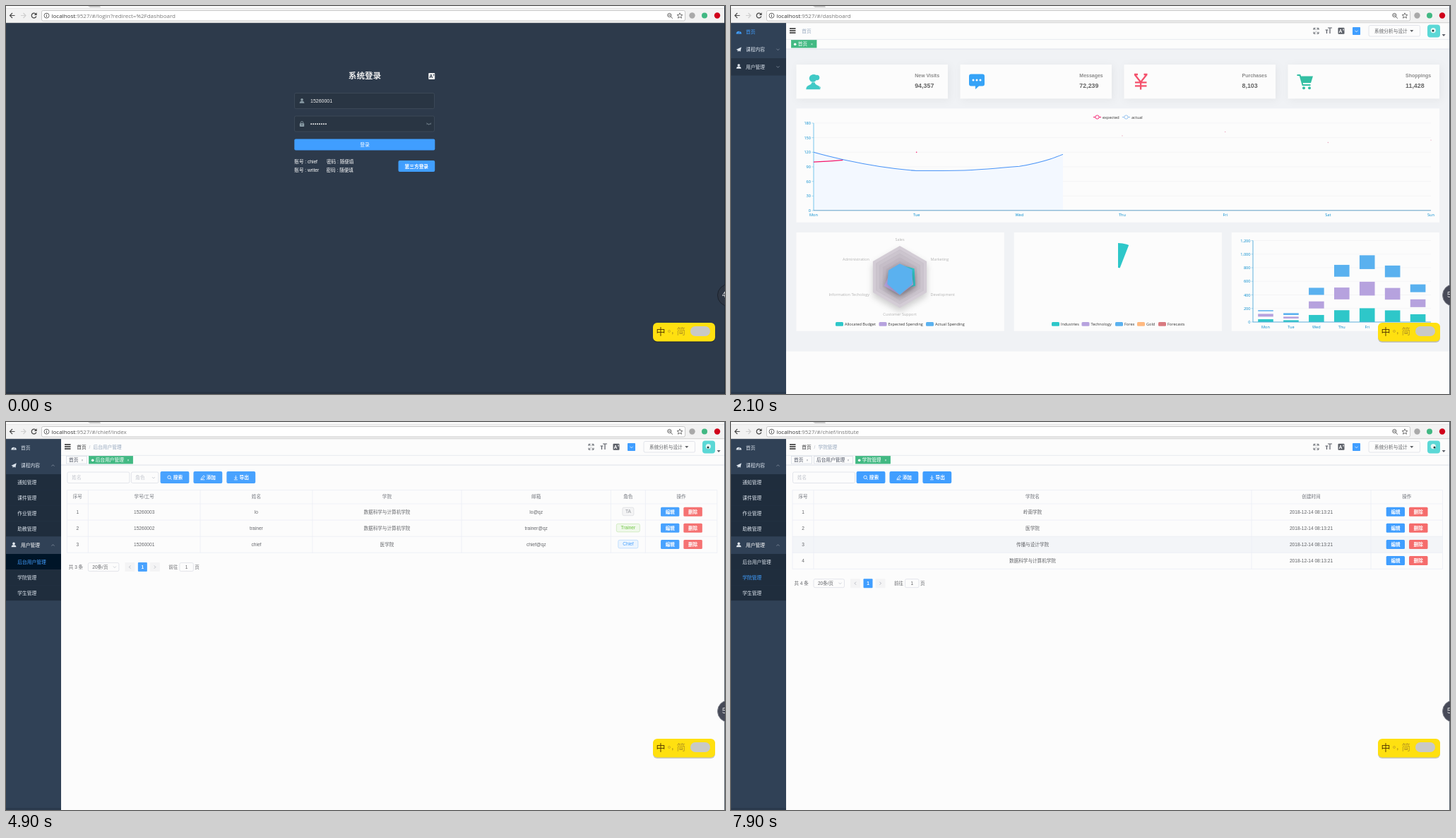
An HTML page that plays this animation: 1018x550 px, repeating every 8 s.

```html
<!DOCTYPE html>
<html lang="zh">
<head>
<meta charset="utf-8">
<title>系统登录</title>
<style>
html, body { margin: 0; width: 100%; height: 100%; overflow: hidden; background: #fcfcfc; }
svg { display: block; }
text { font-family: 'Liberation Sans', 'Noto Sans CJK SC', 'Noto Sans CJK', sans-serif; white-space: pre; }
.c { font-family: 'Open Sans', 'Noto Sans', 'Noto Sans CJK SC', sans-serif; }
</style>
</head>
<body>
<svg id="stage" width="1018" height="550" viewBox="0 0 1018 550"></svg>
<script>
const LOOP = 8000, STEP = 100;
const MID = 'text-anchor="middle" ', END = 'text-anchor="end" ', BOLD = 'font-weight="700" ', CH = 'class="c" ';
const BLUE = '#409eff', PAPER = '#fcfcfc', GREEN = '#42b983', INK = '#606266', EDGE = '#dcdfe6';
const PALETTE = ['#2ec7c9', '#b6a2de', '#5ab1ef', '#ffb980', '#d87a80'];
const DAYS = ['Mon', 'Tue', 'Wed', 'Thu', 'Fri', 'Sat', 'Sun'];

const clamp = v => Math.max(0, Math.min(1, v));
const at = (t, steps) => steps.reduce((v, s) => t >= s[0] ? s[1] : v, steps[0][1]);
const expOut = p => p >= 1 ? 1 : 1 - 2 ** (-10 * p);
const cubicInOut = p => p < .5 ? 4 * p ** 3 : 1 - 4 * (1 - p) ** 3;
const quadOut = p => p * (2 - p);
// CSS "ease"
function ease(x) {
  x = clamp(x);
  if (x === 0 || x === 1) return x;
  let a = 0, b = 1, m;
  const bez = (u, p, q) => 3 * (1 - u) ** 2 * u * p + 3 * (1 - u) * u * u * q + u ** 3;
  for (let i = 0; i < 20; i++) {
    m = (a + b) / 2;
    if (bez(m, .25, .25) < x) a = m; else b = m;
  }
  return bez(m, .1, 1);
}

const R = (x, y, w, h, fill, o = '') => `<rect x="${x}" y="${y}" width="${w}" height="${h}" fill="${fill}" ${o}/>`;
const C = (x, y, r, fill, o = '') => `<circle cx="${x}" cy="${y}" r="${r}" fill="${fill}" ${o}/>`;
const P = (d, fill, o = '') => `<path d="${d}" fill="${fill}" ${o}/>`;
const L = (d, c, w = 1, o = '') => `<path d="${d}" fill="none" stroke="${c}" stroke-width="${w}" ${o}/>`;
const T = (x, y, s, size = 6.7, fill = INK, o = '') => `<text x="${x}" y="${y + size * .36}" font-size="${size}" fill="${fill}" ${o}>${s}</text>`;
const G = (x, y, body, o = '') => `<g transform="translate(${x} ${y})" ${o}>${body}</g>`;
const box = (x, y, w, h, c = EDGE, fill = PAPER) => R(x + .5, y + .5, w - 1, h - 1, fill, `rx="2" stroke="${c}" stroke-width=".8"`);
const chevron = (x, y, c, up) => L(`M${x - 2} ${y + (up ? 1 : -1)}l2 ${up ? -2 : 2}l2 ${up ? 2 : -2}`, c, .8);
const person = (x, y, c) => C(x, y - 1.6, 1.8, c) + P(`M${x - 3.4} ${y + 3.2}q0 -3 3.4 -3t3.4 3z`, c);

function langIcon(x, y, fill, ink) {
  return R(x - 4.5, y - 4.5, 9, 9, fill, 'rx="1"') + T(x - 1, y + .4, 'A', 7, ink, MID + BOLD) + L(`M${x + 2} ${y - 2}h2m-1 -1v3`, ink, .6);
}

function browser(t) {
  const path = at(t, [[0, 'login?redirect=%2Fdashboard'], [1000, 'dashboard'], [4000, 'chief/index'], [6200, 'chief/institute']]);
  return R(0, 0, 1018, 24, '#f2f2f2') + R(0, 0, 1018, 3, '#fafafa') + L('M0 3.5H1018', '#e2e2e2', .8)
    + P('M116 0h17l1 2h-15z', '#c9c9c9') + L('M0 23.7H1018', '#b9b9b9', .6)
    + L('M12.5 13.5H5.5m3.5 -3.5l-3.5 3.5l3.5 3.5', '#4a4a4a', 1.2) + L('M21 13.5h7m-3.5 -3.5l3.5 3.5l-3.5 3.5', '#cfcfcf', 1.2)
    + L('M42.4 11.5a3.4 3.4 0 1 0 .5 3', '#444', 1.2) + P('M43.6 9.3v3.8h-3.8z', '#444')
    + box(50, 6, 912, 15.5, '#bdbdbd', '#fff')
    + C(57.5, 13.6, 3.5, 'none', 'stroke="#555" stroke-width=".9"') + L('M57.5 13v2.6m0 -4.3v1', '#555', 1)
    + `<text class="c" x="64.5" y="16.6" font-size="8" fill="#777"><tspan fill="#333">localhost</tspan>:9527/#/${path}</text>`
    + C(939.3, 13, 2.6, 'none', 'stroke="#555" stroke-width=".9"') + L('M941.2 15l2.6 2.6M938 13h2.6', '#555', 1)
    + L('M954 9.8l1.1 2.6 2.8 .2 -2.1 1.8 .7 2.8 -2.5 -1.5 -2.5 1.5 .7 -2.8 -2.1 -1.8 2.8 -.2z', '#555', .8)
    + C(971.5, 13.5, 4.2, '#a9a9a9') + C(989, 13.5, 4, '#41b883') + C(1007, 13.5, 4.2, '#d0021b');
}

function login(t) {
  const field = y => box(408, y, 199, 23, '#414d5c', '#293543');
  let s = R(0, 24, 1018, 526, '#2d3a4b') + R(0, 547, 1018, 3, '#283342')
    + T(508, 99, '系统登录', 11.6, '#eee', MID + BOLD) + langIcon(602.7, 99.5, '#f2f2f2', '#2d3a4b')
    + field(123) + field(155.5) + person(419, 134.5, '#889aa4') + T(431, 134.5, '15260001', 7, '#f2f2f2')
    + R(415.8, 166.3, 6.4, 4.6, '#889aa4', 'rx=".7"') + L('M417.2 166.5v-1a1.8 1.8 0 0 1 3.6 0v1', '#889aa4', .9) + C(419, 168.4, .7, '#293543');
  for (let i = 0; i < 8; i++) s += C(432.2 + i * 2.95, 167.2, 1, '#f2f2f2');
  s += L('M595.3 165.8q3.4 3.4 6.8 0m-5.6 1.2l-.7 1.1m5 -1.1l.7 1.1m-2.8 -.5v1.2', '#889aa4', .7)
    + R(408.3, 188.5, 199, 16, t < 700 ? BLUE : '#50a6ff', 'rx="2"') + T(508, 196.6, '登录', 6.8, '#fff', MID);
  ['chief', 'writer'].forEach((name, i) => {
    const y = 220.5 + i * 11.8;
    s += T(408.3, y, '账号 : ' + name, 6.6, '#fff') + T(454 - i * .5, y, '密码 : 随便填', 6.6, '#fff');
  });
  return s + R(555.5, 219, 51.7, 16, BLUE, 'rx="2"') + T(581.3, 227.2, '第三方登录', 6.7, '#fff', MID + BOLD);
}

function sidebar(t) {
  const hover = at(t, [[0, ''], [1900, '用户管理'], [2200, '课程内容'], [2700, '通知管理'], [2800, '课件管理'], [2900, '作业管理'],
    [3000, '助教管理'], [3200, '用户管理'], [3700, '后台用户管理'], [5400, '学院管理'], [7000, '']]);
  const active = at(t, [[0, '首页'], [4200, '后台用户管理'], [6300, '学院管理']]);
  const open1 = ease((t - 2350) / 300), open2 = ease((t - 3350) / 300);
  const hue = n => n === active ? BLUE : '#dbe3ec';
  const top = (y, n) => (hover === n ? R(0, y, 78, 24.5, '#263445') : '') + T(21, y + 12.2, n, 6.75, n === '用户管理' && t >= 4200 ? '#fff' : hue(n));
  const subs = (y, names, k, id) => k <= 0 ? '' : `<clipPath id="${id}">${R(0, y, 78, names.length * 22.1 * k, '#000')}</clipPath><g clip-path="url(#${id})">`
    + names.map((n, i) => R(0, y + i * 22.1, 78, 22.2, n === hover ? '#001528' : '#1f2d3d') + T(16.3, y + i * 22.1 + 11.3, n, 6.75, hue(n))).join('') + '</g>';
  const y2 = 74 + 88.4 * open1;
  return R(0, 24, 78, 526, '#304156') + R(0, 547, 78, 3, '#2a394c')
    + top(24.5, '首页') + P('M7.4 39.5a3.7 3.7 0 1 1 7.4 0z', hue('首页')) + L('M11 38.8l1.3 -2.6', '#304156', .7)
    + top(49.2, '课程内容') + P('M7.5 61.8l7.2 -3.6 -1.4 6.6 -2.1 -1.3 -1.5 1.6 -.2 -2.3z', '#dbe3ec') + chevron(66.5, 61.7, '#8794a4', open1 > .5)
    + subs(74, ['通知管理', '课件管理', '作业管理', '助教管理'], open1, 'sub1')
    + top(y2, '用户管理') + person(11, y2 + 11.6, '#e3e9f0') + chevron(66.5, y2 + 12.3, '#8794a4', open2 > .5)
    + subs(y2 + 24.6, ['后台用户管理', '学院管理', '学生管理'], open2, 'sub2');
}

function header(t) {
  const page = t < 4000 ? 0 : t < 6200 ? 1 : 2, name = ['首页', '后台用户管理', '学院管理'][page];
  const shown = page === 0 ? 0 : ease((t - (page === 1 ? 4150 : 6250)) / 500);
  const tab = (x, w, s, on) => R(x + .5, 48.5, w - 1, 10.5, on ? GREEN : PAPER, `stroke="${on ? GREEN : '#d8dce5'}" stroke-width=".8"`)
    + (on ? C(x + 5.7, 54.3, 1.8, '#fff') : '') + T(x + (on ? 9.8 : 4), 53.9, s, 6.7, on ? '#fff' : '#495060') + T(x + w - 7, 54.5, '×', 5, on ? '#fff' : '#8b919c', MID);
  const k = Math.floor(t / STEP);
  let s = R(78, 24, 940, 37, PAPER) + L('M78 47.4H1018', '#e4e7ed', .8) + L('M78 61H1018', '#d8dce5', .9)
    + L('M83 32h8.5m-8.5 3h8.5m-8.5 3h8.5', '#222', 1.3)
    + T(100.3, 35.2, '首页', 6.7, page ? '#303133' : '#97a8be')
    + (page ? T(117.5, 35.2, '/', 6.7, '#b6bcc8') + T(123.5, 35.2, name, 6.7, '#97a8be', `opacity="${shown}"`) : '')
    + L('M825 34v-2.6h2.6M832 34v-2.6h-2.6M825 36.6v2.6h2.6M832 36.6v2.6h-2.6M825.3 31.7l2.4 2.4m4 -2.4l-2.4 2.4m-4 4.8l2.4 -2.4m4 2.4l-2.4 -2.4', '#5a5e66', .9)
    + L('M841.5 34h4m-2 0v5M845 31h6m-3 0v8', '#5a5e66', 1.2) + langIcon(864, 35.3, '#5a5e66', '#fff')
    + R(880, 30, 11, 11, BLUE, 'rx=".8"') + chevron(885.5, 35.8, '#fff')
    + box(902.5, 27, 73.5, 16.5) + T(911, 35.4, '系统分析与设计', 6.7) + P('M961.3 34h5l-2.5 3z', INK)
    + R(986, 26.5, 18, 18, '#5bd8d6', 'rx="4"') + C(994.3, 34.6, 3.6, '#e6f7f4') + C(993 + k % 4, 35 + k % 3, 1.5, '#24383a')
    + P('M1006.6 40h5l-2.5 3z', '#5a5e66');
  if (!page) return s + tab(85, 36.5, '首页', true);
  s += tab(85, 30, '首页');
  return s + (page === 1 ? tab(117, 63, name, true) : tab(117, 56, '后台用户管理') + tab(176, 50, name, true));
}

// smooth line through seven daily values, handles kept inside the data range
function curve(values) {
  const pts = values.map((v, i) => [117 + i * 145.67, 290 - v * .689]);
  const ys = pts.map(p => p[1]), lo = Math.min(...ys), hi = Math.max(...ys);
  const fit = (x, y) => `${x.toFixed(2)} ${Math.max(lo, Math.min(hi, y)).toFixed(2)} `;
  let d = `M${pts[0]}`, h = pts[0];
  for (let i = 1; i < pts.length; i++) {
    const a = pts[i - 1], p = pts[i], b = pts[i + 1] || p;
    const prev = Math.hypot(p[0] - a[0], p[1] - a[1]), next = Math.hypot(b[0] - p[0], b[1] - p[1]);
    const r = next / (next + prev), vx = (b[0] - a[0]) / 2, vy = (b[1] - a[1]) / 2;
    const c = b === p ? p : [p[0] - vx * (1 - r), p[1] - vy * (1 - r)];
    d += 'C' + fit(...h) + fit(...c) + fit(...p);
    h = [p[0] + vx * r, p[1] + vy * r];
  }
  return d;
}
const EXPECTED = [100, 120, 161, 134, 105, 160, 165], ACTUAL = [120, 82, 91, 154, 162, 140, 145];

function lineChart(ms) {
  const p = clamp(ms / 2800), w1 = 874 * cubicInOut(p), w2 = 874 * quadOut(p), blue = curve(ACTUAL);
  let s = '';
  for (let v = 0; v <= 180; v += 30) {
    const y = 290 - v * .689;
    s += L(`M117 ${y}H991`, '#f0f0f1', .6) + T(113, y, v, 5.6, '#008acd', CH + END) + L(`M114.5 ${y}h2.5`, '#7cc4e8', .6);
  }
  s += `<clipPath id="w1">${R(116, 146, w1 + 1, 150, '#000')}</clipPath><clipPath id="w2">${R(116, 146, w2 + 1, 150, '#000')}</clipPath>`
    + P(blue + 'V290H117z', '#f3f8ff', 'clip-path="url(#w2)"')
    + L('M117 166V290', '#69c0ea', .9) + L('M117 289.8H991', '#5599c4', .9)
    + L(curve(EXPECTED), '#f5176a', 1.1, 'clip-path="url(#w1)"') + L(blue, '#4a94f7', 1.1, 'clip-path="url(#w2)"');
  DAYS.forEach((d, i) => {
    const x = 117 + i * 145.67;
    s += T(x, 296, d, 5.6, '#008acd', CH + MID);
    if (x > 117 + w2) s += C(x, 290 - ACTUAL[i] * .689, .7, '#e9a0b8');
    if (x > 117 + w1 && (i === 1 || i > 4 && p > .5)) s += C(x, 290 - EXPECTED[i] * .689, .8, '#f5176a');
  });
  [[513, '#f5176a', 'expected'], [554, '#8dbdee', 'actual']].forEach(([x, c, n]) => {
    s += L(`M${x} 157.5h11`, c, 1) + C(x + 5.5, 157.5, 2.6, PAPER, `stroke="${c}" stroke-width=".9"`) + T(x + 13, 157.5, n, 5.6, '#333', CH);
  });
  return s;
}

const legend = items => items.map(([x, n], i) => R(x, 448, 11, 5.8, PALETTE[i], 'rx="1.5"') + T(x + 13, 451, n, 5.57, '#333', CH)).join('');

function radarChart(ms) {
  const k = expOut(ms / 3000);
  const ring = v => 'M' + v.map((r, i) => `${239 - 44 * r * Math.sin(i * Math.PI / 3)} ${384 - 44 * r * Math.cos(i * Math.PI / 3)}`).join('L') + 'z';
  const hex = r => ring(Array(6).fill(r));
  let s = '<filter id="blur" x="-50%" y="-50%" width="200%" height="200%"><feGaussianBlur stdDeviation="5"/></filter>'
    + G(0, 5, P(hex(1), '#555', 'opacity=".28" filter="url(#blur)"')) + P(hex(1), '#d3ccd5');
  for (let i = 7; i; i--) s += P(hex(i / 8), 'rgba(80,65,85,.05)', 'stroke="#b9b1bc" stroke-width=".3"');
  [[.5, .35, .6, .55, .75, .7], [.4, .45, .75, .75, .65, .55], [.55, .55, .6, .75, .6, .6]].forEach((v, i) => {
    const d = ring(v.map(n => n * k));
    s += G(0, 3, P(d, '#333', 'opacity=".25" filter="url(#blur)"')) + P(d, PALETTE[i]);
  });
  [[239, 331, 'Sales', MID], [196, 359, 'Administration', END], [196, 409, 'Information Techology', END],
    [239, 437, 'Customer Support', MID], [282.5, 409, 'Development', ''], [282.5, 359, 'Marketing', '']]
    .forEach(([x, y, n, o]) => s += T(x, y, n, 5.5, '#b3b3b3', CH + o));
  return s + legend([[148, 'Allocated Budget'], [209.5, 'Expected Spending'], [276, 'Actual Spending']]);
}

function pieChart(ms) {
  const X = 548, Y = 378, full = cubicInOut(clamp(ms / 2600)) * 2 * Math.PI;
  const pt = (r, a) => `${X + r * Math.sin(a)} ${Y - r * Math.cos(a)}`;
  const sector = (r0, r, a, b) => `M${pt(r0, a)}L${pt(r, a)}A${r} ${r} 0 ${b - a > Math.PI ? 1 : 0} 1 ${pt(r, b)}L${pt(r0, b)}A${r0} ${r0} 0 ${b - a > Math.PI ? 1 : 0} 0 ${pt(r0, a)}z`;
  const labels = [['M586.5 361L592 359H598', 599, 359, 'Industries', ''], ['M546.5 411L537 427H523', 522, 427, 'Technology', END],
    ['M525 381L510 383.5H494', 493, 384, 'Forex', END], ['M535 365L530 346H514', 512, 346, 'Gold', END], ['M545 365L541 336H525', 523, 336, 'Forecasts', END]];
  let a = 0, s = `<clipPath id="sweep"><path d="${sector(.1, 200, 0, Math.min(full, 6.283))}"/></clipPath><g clip-path="url(#sweep)">`;
  [320, 240, 149, 100, 59].forEach((v, i) => {
    const b = a + v / 868 * 2 * Math.PI, [d, x, y, n, o] = labels[i];
    s += P(sector(7, 7 + 35 * v / 320, a, b), PALETTE[i]) + L(d, PALETTE[i], .6) + T(x, y, n, 5.5, PALETTE[i], CH + o);
    a = b;
  });
  return s + '</g>' + legend([[454, 'Industries'], [496.5, 'Technology'], [544, 'Forex'], [575, 'Gold'], [605, 'Forecasts']]);
}

function barChart(ms) {
  const k = expOut(ms / 6000), u = .09625;
  let s = '';
  for (let v = 0; v <= 1200; v += 200) {
    const y = 448 - v * u;
    s += L(`M739 ${y}H991`, '#f0f0f1', .6) + T(735.5, y, v.toLocaleString('en-US'), 5.6, '#008acd', CH + END) + L(`M736.5 ${y}h2.5`, '#7cc4e8', .6);
  }
  [79, 52, 200, 334, 390, 330, 220].forEach((v, i) => {
    const x = 757 + i * 35.93;
    let base = 448;
    [v, i ? v : 80, i ? v : 30].forEach((n, j) => {
      s += R(x - 10.8, base - n * u * k, 21.6, n * u * k, PALETTE[j]);
      base -= n * u;
    });
    s += T(x, 454.5, DAYS[i], 5.6, '#008acd', CH + MID);
  });
  return s + L('M739 332.5V448', '#4fa9da', .9) + L('M739 448H991', '#4fa9da', .9);
}

function counters(t) {
  const ms = t < 2100 ? (t - 1197) * 1.052 : t < 3100 ? 950 + (t - 2100) * 1.052 : 2002 + (t - 3100) * .985;
  const cards = [['New Visits', 102400, 2600, 260.2], ['Messages', 81212, 3000, 493.3], ['Purchases', 9280, 3200, 723.5], ['Shoppings', 13600, 3600, 955]];
  const icons = [
    C(117.5, 101.5, 4.6, '#40c9c6') + C(121.5, 101.5, 3.8, '#40c9c6') + P('M115 107q3 4 9 6q3.500 1.500 3 4h-8z', '#40c9c6') + P('M106 118.500q0 -5 4.500 -6.500q4 -1.500 3.500 -4h5q-.5 2.500 3 4q4.500 1.500 4.500 6.500z', '#40c9c6', 'stroke="#fcfcfc" stroke-width=".6"') + C(116, 102.5, 5.2, '#40c9c6'),
    P('M340 96.500h16q3 0 3 3v11q0 3 -3 3h-5l-5 4.500v-4.500h-6q-3 0 -3 -3v-11q0 -3 3 -3z', '#36a3f7') + [343, 348, 353].map(x => C(x, 105, 1.5, '#fff')).join(''),
    L('M571.500 97l8.600 11l8.600 -11M580.100 108v10.500M572 108.300h16.500m-16.500 5h16.500M571 97h5m8.500 0h5', '#f4516c', 2.3),
    L('M801.500 98h4l4 14h11', '#34bfa3', 2) + P('M806 99.500h18l-3 9.500h-12.500z', '#34bfa3') + C(811, 116.2, 2, '#34bfa3') + C(819, 116.2, 2, '#34bfa3')];
  return cards.map(([n, end, span, x], i) => {
    const p = clamp(ms / span), v = p >= 1 ? end : Math.round(end * (1 - 2 ** (-10 * p)) * 1024 / 1023);
    return R(92.5 + i * 232, 83, 214.5, 48.300, PAPER, 'style="filter:drop-shadow(2px 2px 6px rgba(0,0,0,.05))"') + icons[i]
      + T(x, 98.5, n, 7, '#8c8c8c', BOLD) + T(x, 113, v.toLocaleString('en-US'), 8.9, '#666', BOLD);
  }).join('');
}

function dashboard(t) {
  const ms = Math.max(0, (t - 1498) * 1.06);
  return R(78, 61.5, 940, 428, '#f0f2f5') + counters(t) + R(92.5, 145.300, 910.5, 161.5, PAPER)
    + [92.5, 400.7, 708.8].map(x => R(x, 321, 294.2, 139.800, PAPER)).join('')
    + (t < 4000 ? lineChart(ms) + radarChart(ms) + pieChart(ms) + barChart(ms) : '');
}

const TAGS = { TA: ['#f4f4f5', '#909399', '#dedfe2', 17], Trainer: ['#f0f9eb', '#67c23a', '#c9e9b8', 34], Chief: ['#ecf5ff', BLUE, '#b3d8ff', 29] };
const BTN_ICONS = [
  (x, y) => C(x - .5, y - .5, 2.2, 'none', 'stroke="#fff" stroke-width=".8"') + L(`M${x + 1} ${y + 1}l2 2`, '#fff', .8),
  (x, y) => L(`M${x - 2} ${y + 1}l3.500 -4l1.500 1.500l-3.500 3.800l-1.700 .3zM${x - 3} ${y + 3}h6`, '#fff', .8),
  (x, y) => L(`M${x} ${y - 3}v4.500m-1.800 -1.800l1.800 1.800l1.800 -1.800M${x - 2.500} ${y + 3}h5`, '#fff', .8)];

function table({ edges, heads, rows, buttons, role }, hot) {
  const mid = i => (edges[i] + edges[i + 1]) / 2, bottom = 116 + rows.length * 23.1, y = bottom + 20.300;
  let s = R(78, 61.500, 940, 488.500, PAPER) + box(87, 70.500, 89, 16.500) + T(94, 79, '姓名', 6.6, '#c0c4cc');
  if (role) s += box(177.500, 70.500, 39.500, 16.500) + T(184, 79, '角色', 6.6, '#c0c4cc') + chevron(209.500, 79, '#c0c4cc');
  ['搜索', '添加', '导出'].forEach((n, i) => {
    const x = buttons + i * 46.900;
    s += R(x, 70, 40.800, 17, BLUE, 'rx="2"') + BTN_ICONS[i](x + 13, 78.800) + T(x + 18.200, 78.800, n, 6.7, '#fff', BOLD);
  });
  if (hot >= 0) s += R(87, 116 + hot * 23.1, 920.500, 23.1, '#f3f5f8');
  heads.forEach((h, i) => s += T(mid(i), 105.800, h, 6.6, '#6f737b', MID));
  rows.forEach((row, r) => {
    const cy = 127.200 + r * 23.1, last = edges.length - 2;
    [r + 1, ...row].forEach((v, i) => {
      const tag = role && i === last - 1 && TAGS[v];
      if (tag) s += box(mid(i) - tag[3] / 2, cy - 6.500, tag[3], 12.500, tag[2], tag[0]);
      s += T(mid(i), cy - (tag ? .3 : 0), v, 6.6, tag ? tag[1] : INK, MID);
    });
    s += R(927.700, cy - 6.500, 26.300, 13, BLUE, 'rx="1.500"') + T(941, cy + .2, '编辑', 6.600, '#fff', MID + BOLD)
      + R(960, cy - 6.500, 26.500, 13, '#f56c6c', 'rx="1.500"') + T(973.200, cy + .2, '删除', 6.600, '#fff', MID + BOLD)
      + L(`M87 ${116 + r * 23.1}H1007.500`, '#ebeef5', .8);
  });
  s += L(`M87 96.500H1007.500M87 ${bottom}H1007.500`, '#ebeef5', .8);
  edges.forEach(x => s += L(`M${x} 96.500V${bottom}`, '#ebeef5', .8));
  return s + T(89.500, y, `共 ${rows.length} 条`, 6.500) + box(116.500, y - 6.500, 44.500, 13) + T(123, y, '20条/页', 6.500) + chevron(154.500, y, '#c0c4cc')
    + R(169, y - 6.500, 14, 13, '#f4f4f5', 'rx="1"') + L(`M177 ${y - 2}l-2 2l2 2`, '#a9adb5', .8)
    + R(187.500, y - 6.500, 13, 13, BLUE, 'rx="1"') + T(194, y, '1', 6.500, '#fff', MID + BOLD)
    + R(204.500, y - 6.500, 14, 13, '#f4f4f5', 'rx="1"') + L(`M210.500 ${y - 2}l2 2l-2 2`, '#a9adb5', .8)
    + T(231, y, '前往', 6.500) + box(246, y - 6.500, 20.500, 13) + T(256.200, y, '1', 6.500, INK, MID) + T(268, y, '页', 6.500);
}

const SCHOOL = '数据科学与计算机学院', STAMP = '2018-12-14 08:13:21';
const USERS = {
  edges: [87, 117, 275.700, 434.500, 645.700, 857, 906, 1007.500], role: true, buttons: 219.200,
  heads: ['序号', '学号/工号', '姓名', '学院', '邮箱', '角色', '操作'],
  rows: [['15260003', 'lo', SCHOOL, 'lo@qz', 'TA'], ['15260002', 'trainer', SCHOOL, 'trainer@qz', 'Trainer'], ['15260001', 'chief', '医学院', 'chief@qz', 'Chief']]
};
const SCHOOLS = {
  edges: [87, 117, 737, 906, 1007.500], buttons: 177.600, heads: ['序号', '学院名', '创建时间', '操作'],
  rows: ['岭南学院', '医学院', '传播与设计学院', SCHOOL].map(n => [n, STAMP])
};

function overlay(t) {
  const bar = at(t, [[0, 0], [1000, 8], [1100, 16], [1200, 25], [1300, 33], [1500, 1018], [1800, 0], [4000, 200], [4100, 890], [4200, 1018], [4400, 0], [6200, 890], [6300, 1018], [6500, 0]]);
  const link = at(t, [[0, ''], [3900, 'index'], [4400, ''], [6200, 'institute'], [6600, '']]), dark = t < 1500;
  return R(0, 23.800, bar, 1.500, dark ? '#2f8fd6' : BLUE)
    + (link ? box(-2, 539, 339.500, 13, '#d0d0d0', '#f2f2f2') + T(.5, 545.300, 'localhost:9527/#/chief/' + link, 7, '#666', CH) : '')
    + R(1017, 0, 1, 550, dark ? '#1f2a38' : '#5c6672')
    + C(1023, 410, 15.500, dark ? '#2e3643' : '#474a58', `stroke="${dark ? '#1c232d' : '#80838d'}" stroke-width="1"`) + T(1014, 409.500, dark ? '4' : '5', 10, '#e6e6e6')
    + R(916, 450, 88, 27, '#000', 'rx="6" opacity=".22"') + R(916, 449, 88, 26.500, '#ffe010', 'rx="6"')
    + T(920.500, 461.300, '中', 13, '#5a3c00') + C(939, 461, 1.500, 'none', 'stroke="#c2a024" stroke-width=".8"') + T(942.500, 461, ',', 9, '#a88a1c', BOLD)
    + T(949.500, 461.300, '简', 12.500, '#b7981f') + R(969, 454, 28, 14, '#c9c9c6', 'rx="7"');
}

function render(t) {
  const fade = (body, from, to) => {
    const a = from ? ease((t - from) / 500) : 1, b = ease((t - to) / 500);
    return a <= 0 || b >= 1 ? '' : G(14 * (a - 1 + b), 0, body(), `opacity="${a * (1 - b)}"`);
  };
  const page = t < 1500 ? login(t) : R(78, 24, 940, 526, PAPER)
    + fade(() => dashboard(t), 0, 4035) + fade(() => table(USERS, -1), 4535, 6130) + fade(() => table(SCHOOLS, at(t, [[0, -1], [7300, 3], [7500, 2]])), 6580, LOOP)
    + sidebar(t) + header(t);
  return page + browser(t) + overlay(t);
}

const stage = document.getElementById('stage'), start = performance.now();
let shown = -1;
function tick() {
  const k = Math.floor((performance.now() - start) % LOOP / STEP);
  if (k !== shown) stage.innerHTML = render((shown = k) * STEP);
  requestAnimationFrame(tick);
}
tick();
</script>
</body>
</html>
```
